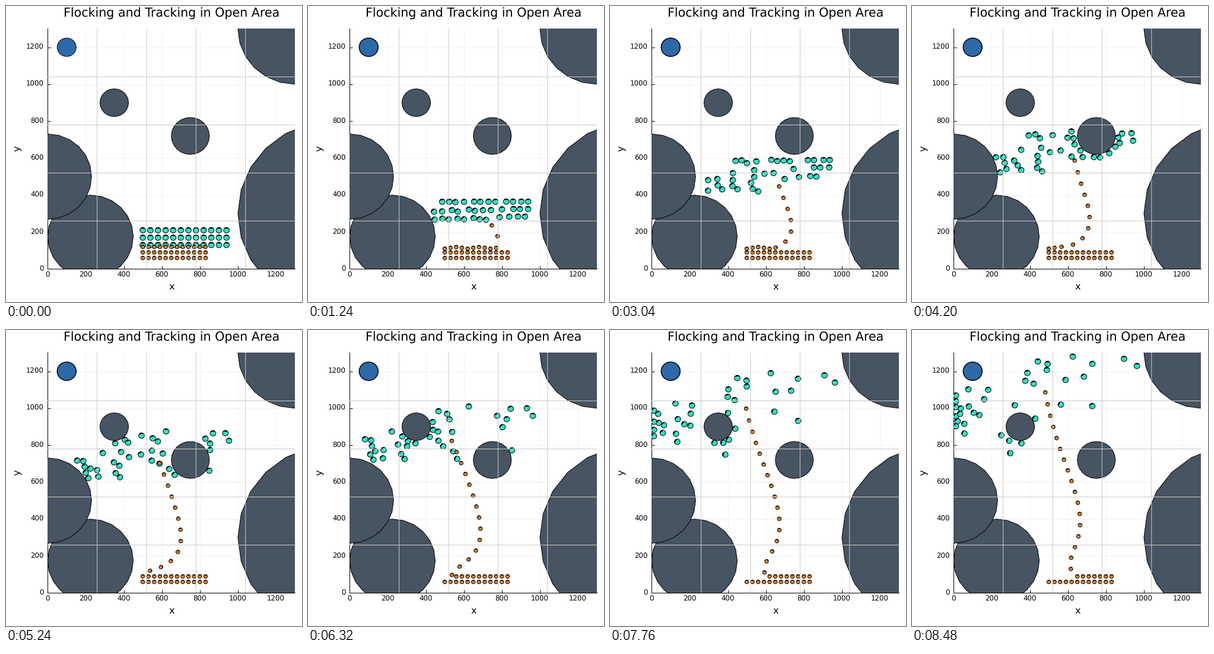
A matplotlib script that plays this animation: 499 by 499 pixels, repeating every 8.52 s.

```python
import numpy as np
import matplotlib.pyplot as plt
from matplotlib.animation import FuncAnimation
from matplotlib.collections import PolyCollection
from matplotlib.patches import Polygon

SIZE, DPI, FRAMES, STEP = 499, 100, 213, 40
WORLD = 1300
PX = 72 / DPI
SLATE, BLUE, TEAL, ORANGE = "#475461", "#2c69a9", "#2be3c8", "#e8832a"
OBSTACLES = [(225, 175, 225), (0, 500, 231), (350, 900, 75),
             (750, 720, 100), (1500, 300, 500), (1300, 1300, 300)]
GOAL = (100, 1200, 50)
TEAL_R, ORANGE_R, SPEED, SPACE = 15, 10, 5, 32

# Lean to the left of straight up, in degrees, at a few columns of each row.
LEAN_COLS = [0, 4, 7, 9, 11]
RISE = [(12, 10, 9, 0, -5), (40, 28, 30, 2, 2), (47, 40, 46, 11, 9)]
TURN = [(22, 5, 42, 20, -6), (30, 42, 37, 20, -4), (40, 40, 40, 40, 42)]
CLOSE = [(20, 0, 10, 45, 8), (35, 30, 60, 65, 0), (45, 40, 60, 60, 85)]
LEAN_TIMES = [0, 30, 66, 86, 148, 168]

LEADER_KEYS = [0, 31, 76, 105, 158, 194, 212]
LEADER = [(830, 120), (747, 236), (670, 447), (636, 587),
          (537, 823), (497, 998), (482, 1086)]


def arc(r, a):
    return r * np.stack([np.cos(a), np.sin(a)], axis=-1)


def circle(x, y, r, sides=24):
    return arc(r, np.arange(sides) * 2 * np.pi / sides) + (x, y)


def push_out(p):
    for x, y, r in OBSTACLES:
        off = p - (x, y)
        dist = np.linalg.norm(off, axis=-1, keepdims=True)
        p = (x, y) + off * np.maximum(1, (r + TEAL_R) / dist)
    return p


def spread(p):
    """Move members that are too close apart from each other."""
    off = p[:, None] - p[None]
    dist = np.linalg.norm(off, axis=-1)
    np.fill_diagonal(dist, SPACE)
    push = np.maximum(0, SPACE - dist) / (2 * dist)
    return p + (off * push[..., None]).sum(axis=1)


def flock_headings():
    rng = np.random.default_rng(4)
    cols = np.arange(12)
    rise, turn, close = (
        np.concatenate([np.interp(cols, LEAN_COLS, row) for row in phase])
        for phase in (RISE, TURN, CLOSE))
    wobble = rng.normal(0, 4, rise.size)
    keys = np.array([0 * rise, rise + wobble, rise + wobble,
                     turn + wobble, turn + wobble, close])
    t = np.arange(FRAMES)
    lean = np.stack([np.interp(t, LEAN_TIMES, k) for k in keys.T], axis=1)
    return np.radians(90 + lean)


def flock():
    """Steady walkers that slide around obstacles and keep their distance."""
    angles = flock_headings()
    p = np.array([(500 + 40 * i, y) for y in (210, 170, 130)
                  for i in range(12)], float)
    out = [p]
    for a in angles[1:]:
        p = push_out(spread(p + arc(SPEED, a)))
        p[:, 0] = np.maximum(p[:, 0], 12)
        out.append(p)
    return np.array(out), angles


def convoy():
    """A leader pulls the others out of their rows like beads on a string."""
    t = np.arange(FRAMES)
    lead = np.stack([np.interp(t, LEADER_KEYS, c) for c in zip(*LEADER)], axis=1)
    xs = np.arange(500, 831, 30)
    rows = [(xs[::-1], 120), (xs, 90), (xs[::-1], 60)]
    p = np.array([(x, y) for row, y in rows for x in row], float)
    gaps = 61 + 8 * np.exp(-np.arange(len(p)) / 2)
    settle = 8
    drop = (-5.5 - 4.5 * np.cos(np.pi * np.arange(9, -1, -1) / 2)) / settle
    out = [p.copy()]
    for n in range(1, FRAMES):
        if n <= settle:
            p[2:12, 1] += drop
        p[0] = lead[n]
        for k in range(1, len(p)):
            off = p[k] - p[k - 1]
            dist = np.hypot(*off)
            if dist <= gaps[k]:
                break
            p[k] = p[k - 1] + off * gaps[k] / dist
        out.append(p.copy())
    tracks = np.array(out)
    return tracks, headings(tracks)


def headings(tracks, span=4):
    t = np.arange(FRAMES)
    d = tracks[np.minimum(t + span, FRAMES - 1)] - tracks[np.maximum(t - span, 0)]
    angle = np.arctan2(d[..., 1], d[..., 0])
    still = np.linalg.norm(d, axis=-1) < 8
    return np.where(still, np.pi / 2, angle)


class Swarm:
    """Round bodies with a black cap that points along the heading."""

    def __init__(self, ax, motion, r, color, z):
        self.tracks, self.angles = motion
        self.r = r
        self.disc = circle(0, 0, r)
        self.cap = np.radians(np.linspace(-56, 56, 11))
        self.bodies = PolyCollection([], fc=color, ec="black", lw=PX, zorder=z)
        self.caps = PolyCollection([], fc="black", ec="none", zorder=z + 0.1)
        ax.add_collection(self.bodies)
        ax.add_collection(self.caps)

    def show(self, n):
        centers = self.tracks[n][:, None]
        self.bodies.set_verts(list(centers + self.disc))
        turn = self.angles[n][:, None] + self.cap
        self.caps.set_verts(list(centers + arc(self.r, turn)))


plt.rcParams["font.family"] = "DejaVu Sans"
plt.rcParams["text.hinting"] = "none"
fig = plt.figure(figsize=(SIZE / DPI, SIZE / DPI), dpi=DPI, facecolor="white")
left, bottom, width, height = 70.2, 55.6, 417, 405
ax = fig.add_axes([left / SIZE, bottom / SIZE, width / SIZE, height / SIZE])
ax.set(xlim=(0, WORLD), ylim=(0, WORLD))
ticks = range(0, WORLD, 200)
ax.set_xticks(ticks, [])
ax.set_yticks(ticks, [])
ax.tick_params(direction="in", length=5 * PX, width=PX)
ax.set_axisbelow(True)
ax.grid(color="black", alpha=0.1, lw=0.5 * PX)
ax.spines[["top", "right"]].set_visible(False)
for side in ("left", "bottom"):
    ax.spines[side].set_linewidth(PX)


def label(x, y, text, px, **kw):
    kw = {"ha": "center", "va": "center", **kw}
    fig.text(x / SIZE, 1 - y / SIZE, text, fontsize=px * PX, **kw)


for v in ticks:
    label(left + v * width / WORLD, 454, str(v), 11.8)
    label(64, SIZE - bottom - v * height / WORLD, str(v), 11.8, ha="right")
label(279, 18.3, "Flocking and Tracking in Open Area", 20.7, va="baseline")
label(279, 473.5, "x", 16.2)
label(20, 240.5, "y", 16.2, rotation=90)

for ob in OBSTACLES:
    ax.add_patch(Polygon(circle(*ob), fc=SLATE, ec="black", lw=PX, zorder=5))
goal = ax.add_patch(Polygon(circle(*GOAL), fc=BLUE, ec="black", lw=PX, zorder=5))
for k in range(1, 5):
    ax.axvline(260 * k, color="#cacaca", lw=PX, zorder=6, snap=False)
    ax.axhline(260 * k, color="#cacaca", lw=PX, zorder=6)

swarms = [Swarm(ax, flock(), TEAL_R, TEAL, 3),
          Swarm(ax, convoy(), ORANGE_R, ORANGE, 4)]


def draw(n):
    for s in swarms:
        s.show(n)
    goal.set_linewidth(PX * (1 + 0.5 * min(n / 10, 1)))


anim = FuncAnimation(fig, draw, frames=FRAMES, interval=STEP, repeat=True,
                     repeat_delay=0, init_func=lambda: draw(0))
plt.show()
```
